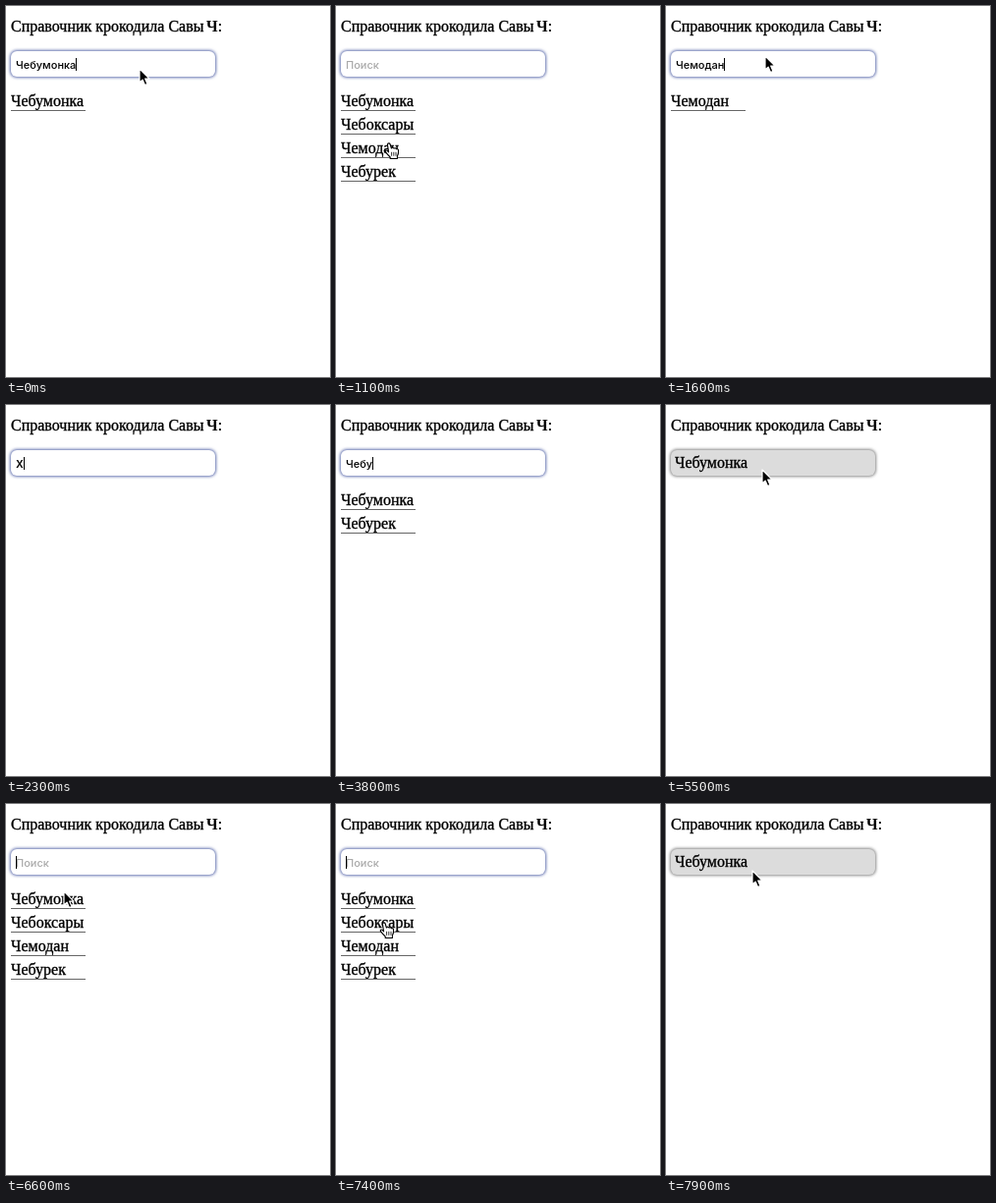
An HTML page that plays this animation: 330 by 378 pixels, repeating every 8000 ms.

```html
<!DOCTYPE html>
<html lang="ru">
<head>
<meta charset="utf-8">
<style>
  html, body { margin: 0; width: 100%; height: 100%; overflow: hidden; background: #fff; }
  svg { display: block; width: 330px; height: 378px; }
  .serif { font: 16px "Liberation Serif", serif; stroke: #000; stroke-width: .35px; }
  .field { font: 500 11px Inter, sans-serif; }
  .bold { font-weight: bold; stroke: none; }
</style>
</head>
<body>
<svg viewBox="0 0 330 378">
  <defs>
    <filter id="soft" x="-5%" y="-40%" width="110%" height="180%">
      <feGaussianBlur stdDeviation="1.8"/>
    </filter>
  </defs>
  <text class="serif" x="5" y="26">Справочник крокодила Савы</text>
  <text class="serif" x="204" y="26"><tspan class="bold">Ч</tspan>:</text>

  <rect id="glow" x="4" y="45" width="210" height="28" rx="7" filter="url(#soft)"/>
  <rect id="box" x="5" y="46" width="208" height="26" rx="6"/>
  <text id="hint" class="field" x="10" y="64" fill="#a9a9a9">Поиск</text>
  <text id="typed" class="field" x="10" y="64"></text>
  <text id="label" class="serif" x="9" y="64"></text>
  <rect id="caret" y="53" width="1" height="13"/>

  <g id="list"></g>

  <g id="arrow" stroke="#fff" stroke-width="1.2" stroke-linejoin="round">
    <path d="M0 0V14L3.1 11.1L5.4 16.6L8 15.5L5.7 10.1H10Z"/>
  </g>
  <g id="hand" fill="#fff" stroke="#000" stroke-width="1.1" stroke-linejoin="round" stroke-linecap="round">
    <path d="M-1.6 1.2C-1.4 -.5 .7 -.5 1.2 1L2.4 5C3 3.8 4.6 4 5 5.2C5.8 4.3 7.1 4.7 7.4 5.8C8.6 5.2 9.6 6 9.6 7.5C9.7 10 9.4 11.5 8.4 13V15.5H1.2V14C-.6 12.5 -2 10.8 -3.6 8.7C-4.4 7.4 -2.9 6.5 -1.8 7.4L-.4 8.8Z"/>
    <path d="M2.6 9.2V12.4M4.8 9.2V12.4M7 9.2V12.4" stroke-width=".8"/>
  </g>
</svg>
<script>
const LOOP = 8000, STEP = 100;
const NAME = 'Чебумонка', BAG = 'Чемодан';
const items = [NAME, 'Чебоксары', BAG, 'Чебурек'];

// [time, text, chosen]
const states = [
  [0, NAME], [100, NAME.slice(0, 7)], [200, NAME.slice(0, 4)], [300, 'Че'], [400, ''],
  [1200, BAG, true], [1600, BAG], [1800, 'Чемода'], [2000, 'Чем'], [2100, ''],
  [2300, 'х'], [2600, ''], [2900, 'Ч'], [3100, 'Че'], [3400, 'Чеб'], [3700, 'Чебу'],
  [4100, NAME.slice(0, 5)], [4300, NAME.slice(0, 6)],
  [5200, NAME, true], [5800, NAME], [6400, ''], [7600, NAME, true]
];

// Pointer trips: visible until the end time, [time, x, y]
const trips = [
  { end: 100, path: [[0, 136, 64]] },
  { end: 1800, path: [[800, 124, 82], [1000, 58, 136], [1100, 54, 140], [1200, 54, 141], [1500, 98, 54], [1600, 101, 51]] },
  { end: 6400, path: [[4700, 96, 74], [5000, 62, 98], [5200, 58, 99], [5500, 98, 66], [5800, 102, 60], [6200, 106, 58]] },
  { end: LOOP, path: [[6400, 100, 60], [6600, 59, 89], [6900, 52, 122], [7200, 48, 166], [7500, 50, 98], [7600, 52, 95], [7900, 88, 68]] }
];

const $ = id => document.getElementById(id);
const show = (el, on) => el.setAttribute('visibility', on ? 'visible' : 'hidden');
const set = (el, attrs) => { for (const k in attrs) el.setAttribute(k, attrs[k]); };

function add(tag, attrs) {
  const el = document.createElementNS('http://www.w3.org/2000/svg', tag);
  set(el, attrs);
  return $('list').appendChild(el);
}

const rows = items.map((_, i) => ({
  text: add('text', { class: 'serif', x: 5, y: 102 + 24 * i }),
  line: add('rect', { x: 5, y: 106 + 24 * i, width: 76, height: 1, fill: '#666' })
}));

function pointerAt(t) {
  const trip = trips.find(p => t >= p.path[0][0] && t < p.end);
  if (!trip) return null;
  const path = trip.path;
  const i = path.findIndex(p => p[0] > t);
  if (i < 0) return path[path.length - 1].slice(1);
  const a = path[i - 1], b = path[i];
  const k = (t - a[0]) / (b[0] - a[0]);
  return [a[1] + (b[1] - a[1]) * k, a[2] + (b[2] - a[2]) * k];
}

function render(t) {
  const [, text, chosen] = states.filter(s => s[0] <= t).pop();
  const found = chosen ? [] : items.filter(s => s.startsWith(text));
  const pointer = pointerAt(t), before = pointerAt(t - STEP);

  rows.forEach(({ text, line }, i) => {
    text.textContent = found[i] || '';
    show(line, i < found.length);
  });

  const hover = chosen && pointer && pointer[1] > 45 && pointer[1] < 73;
  $('box').setAttribute('fill', hover ? '#dcdcdc' : '#fff');
  $('glow').setAttribute('fill', chosen ? '#888' : '#6070ae');
  $('label').textContent = chosen ? text : '';

  const typed = $('typed');
  typed.textContent = chosen ? '' : text;
  typed.style.fontSize = text === 'х' ? '14px' : '11px';
  show($('hint'), !text);
  const width = text && !chosen ? typed.getComputedTextLength() : 0;
  $('caret').setAttribute('x', Math.round(10 + width));
  show($('caret'), !chosen && !(t >= 600 && t < 1200));

  const overList = p => p && p[0] < 82 && p[1] > 86 && p[1] < 86 + 24 * found.length;
  const hand = overList(pointer) && overList(before);
  show($('hand'), pointer && hand);
  show($('arrow'), pointer && !hand);
  if (pointer) {
    const place = `translate(${pointer.map(Math.round)})`;
    set($('hand'), { transform: place });
    set($('arrow'), { transform: place });
  }
}

const start = performance.now();
function tick() {
  const t = (performance.now() - start) % LOOP;
  render(Math.floor(t / STEP) * STEP);
  requestAnimationFrame(tick);
}
tick();
</script>
</body>
</html>
```
